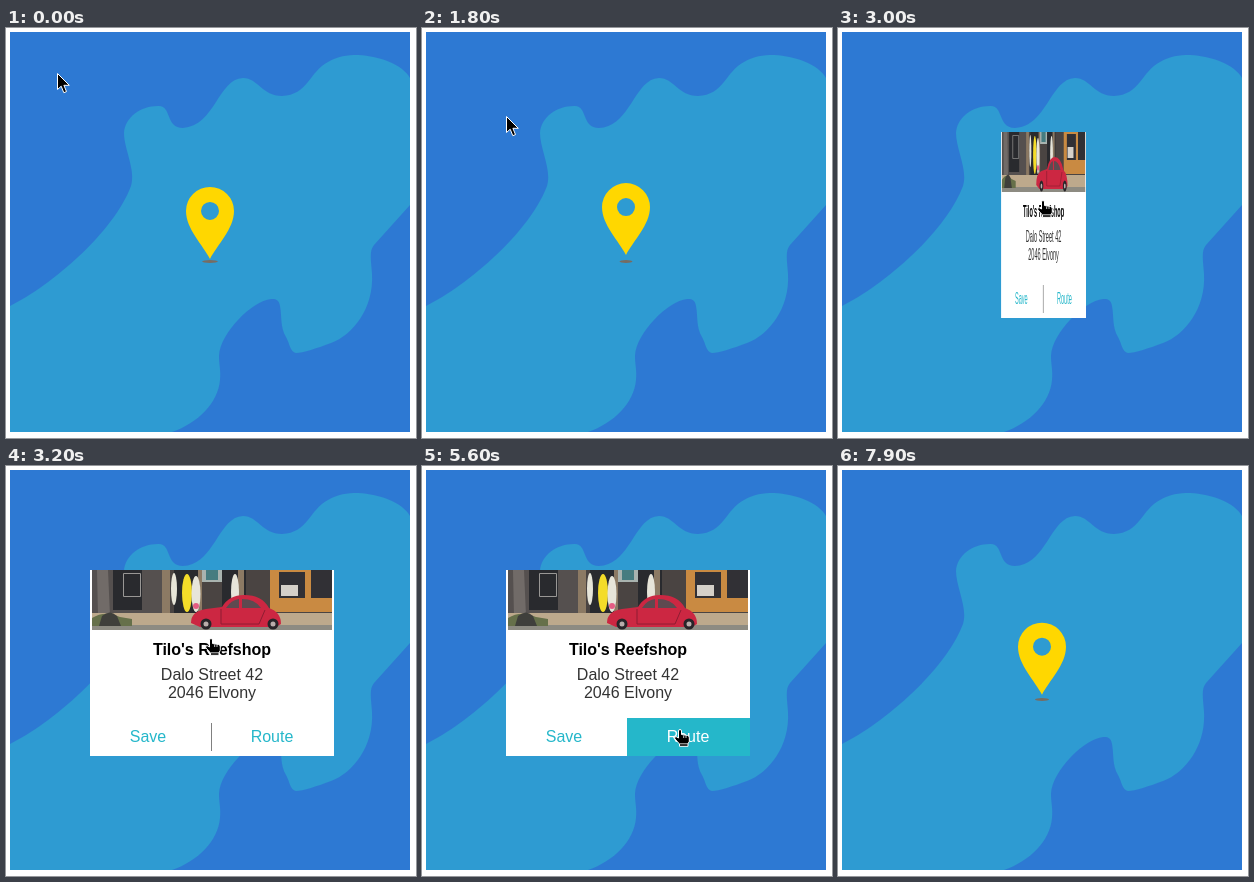
Recreate the animation shown at these times as an HTML page. Size 410 by 410 pixels, loop 8 s.

```html
<!DOCTYPE html>
<html lang="en">
<head>
<meta charset="utf-8">
<title>Map pin with info card</title>
<style>
  html, body { margin: 0; width: 100%; height: 100%; overflow: hidden; background: #fff; }
  svg { display: block; width: 100vw; height: 100vh; }
  text { font: 16px "Liberation Sans", Arial, sans-serif; text-anchor: middle; fill: #333; }
  .title { font-weight: bold; fill: #000; }
  .button rect { fill: none; }
  .button text { fill: #25b7ca; }
  .button.hover rect { fill: #25b7ca; }
  .button.hover text { fill: #fff; }
  .button.hover line { display: none; }
</style>
</head>
<body>
<svg viewBox="0 0 410 410">
  <rect x="4" y="4" width="400" height="400" fill="#2d79d3"/>
  <path fill="#2e9bd2" d="M4 278C45 258 108 204 125 158C130 142 118 121 118 105
    C119 89 135 78 152 78C166 77 159 100 177 100C209 98 212 51 237 50
    C252 50 256 68 276 68C302 67 303 44 322 34C332 28 341 27 352 27
    C374 28 397 37 404 50V177L368 217C363 223 365 232 366 246
    C368 280 347 307 325 315C312 320 296 325 290 325C284 324 284 316 280 309
    C274 299 276 288 274 278C273 271 269 271 265 271C246 273 214 305 213 328
    C213 337 215 342 214 352C212 375 192 395 166 404H4Z"/>

  <g id="marker">
    <ellipse id="shadow" cx="204" cy="233.5" ry="1.5" fill="#776c62"/>
    <path id="pin" fill="#ffd700" fill-rule="evenodd"
      d="M0 72C-7 58-24 42-24 24A24 24 0 0 1 24 24C24 42 7 58 0 72ZM-9 24a9 9 0 1 0 18 0a9 9 0 1 0-18 0Z"/>
  </g>

  <g id="card">
    <rect x="84" y="104" width="244" height="186" fill="#fff"/>
    <svg x="86" y="104" width="240" height="60" viewBox="0 0 240 60">
      <rect width="240" height="60" fill="#4a4442"/>
      <path fill="#55504f" d="M0 0h76v46H0z"/>
      <path fill="#292a2e" d="M21 0h29v40h-29zM82 0h24v44h-24zM130 0h24v44h-24z"/>
      <path fill="none" stroke="#999795" d="M31.500 3.500h17v23h-17z"/>
      <path fill="#716b68" d="M5 0h11l2 46H6z"/>
      <path fill="#8c7a64" d="M70 0h8v44h-8zM106 0h4v44h-4zM146 0h6v44h-6z"/>
      <path fill="#a9b3af" d="M110 0h20v12h-20z"/>
      <path fill="#467c80" d="M114 0h12v10h-12z"/>
      <path fill="#c98a42" d="M178 0h62v42h-62z"/>
      <path fill="#313035" d="M187 2h26v26h-26zM219 0h21v28h-21z"/>
      <path fill="#d5d0c9" d="M189 15h17v11h-17z"/>
      <path fill="#bda98c" d="M0 43h240v17H0z"/>
      <path fill="#8d8b82" d="M0 55h240v5H0z"/>
      <path fill="#66704a" d="M0 48q13-8 28-1l12 2v7H0z"/>
      <path fill="#3f3f3b" d="M10 46q8-7 15 0l4 10H7z"/>
      <ellipse cx="95" cy="23" rx="5" ry="19" fill="#f4dc29"/>
      <g fill="#e7e5d9">
        <ellipse cx="82" cy="19" rx="3" ry="16"/>
        <ellipse cx="104" cy="24" rx="4.500" ry="18"/>
        <ellipse cx="143" cy="22" rx="4" ry="18"/>
      </g>
      <circle cx="104" cy="36" r="3" fill="#e55c83"/>
      <path fill="#cc2742" d="M99 53q0-12 15-14l16-2q7-12 22-12q18 0 25 13q12 4 12 16l-5 3h-76z"/>
      <path fill="#5d4a50" d="M134 38q5-8 13-9v9zM150 29q13 0 19 9h-19z"/>
      <path fill="none" stroke="#8e1d32" d="M129 39v15h38l6-14"/>
      <g fill="#b9adab" stroke="#282529" stroke-width="3">
        <circle cx="114" cy="54" r="4"/><circle cx="181" cy="54" r="4"/>
      </g>
    </svg>
    <text class="title" x="206" y="189">Tilo's Reefshop</text>
    <text x="206" y="214">Dalo Street 42</text>
    <text x="206" y="232">2046 Elvony</text>
    <g class="button" id="save">
      <rect x="84" y="252" width="116" height="38"/>
      <text x="142" y="276">Save</text>
    </g>
    <g class="button" id="route">
      <rect x="205" y="252" width="123" height="38"/>
      <line x1="205.500" x2="205.500" y1="257" y2="285" stroke="#808080"/>
      <text x="266" y="276">Route</text>
    </g>
  </g>

  <g id="cursor" stroke="#fff" stroke-linejoin="round">
    <path id="arrow" d="M.5.500V16.500L4.200 13.200 6.800 19.700 9.500 18.600 6.900 12.300H12.300Z"/>
    <g id="hand" transform="translate(-1 -1)">
      <path d="M4.500 9V2a1.500 1.500 0 0 1 3 0v3.500l6 1q1.800 .5 1.800 2.300v3.500l-1.300 2.500v2.500H5.500v-2.300L.8 9.800Q.3 7.500 2 7.500Z"/>
      <path fill="none" stroke-width=".8" d="M6 14.800h8M9.700 6.500v2.500M12 7v2"/>
    </g>
  </g>
</svg>
<script>
const LOOP = 8000, STEP = 100, CARD_OPEN = 3000, CARD_CLOSE = 6500;
const el = id => document.getElementById(id);
const between = (t, from, to) => t >= from && t < to;
const show = (id, on) => el(id).setAttribute("display", on ? "inline" : "none");

const linear = u => u;
const easeIn = u => u * u;
const easeOut = u => 1 - (1 - u) ** 1.5;
const easeInOut = u => u * u * (3 - 2 * u);

// The cursor rests between glides.
const home = [51, 45];
const glides = [
  { from: 1300, to: 1900, end: [98, 107], ease: easeIn },
  { from: 1900, to: 2500, end: [200, 173], ease: linear },
  { from: 4000, to: 4700, end: [152, 260], ease: easeInOut },
  { from: 4700, to: 4900, end: [147, 269], ease: linear },
  { from: 5200, to: 5600, end: [253, 264], ease: easeInOut },
  { from: 5600, to: 6100, end: [286, 265], ease: linear },
  { from: 6100, to: 6500, end: [369, 244], ease: easeOut },
  { from: 6500, to: 7000, end: [81, 55], ease: easeOut }
];

function cursorAt(t) {
  return glides.reduce((pos, { from, to, end, ease }) => {
    const u = ease(Math.min(1, Math.max(0, (t - from) / (to - from))));
    return pos.map((p, i) => p + (end[i] - p) * u);
  }, home);
}

function draw(time) {
  const t = Math.floor(time / STEP) * STEP;
  const open = between(t, CARD_OPEN, CARD_CLOSE);

  // The bob picks up a new phase once the card has closed.
  const phase = t < CARD_CLOSE ? t - 400 : t - 4900;
  const bob = Math.cos(phase / 4000 * 2 * Math.PI);
  el("pin").setAttribute("transform", `translate(204 ${156.7 + 2.7 * bob})`);
  el("shadow").setAttribute("rx", 7 + bob);
  show("marker", !open);

  // The card turns to face the viewer.
  const turn = Math.min(1, Math.max(0, (t - CARD_OPEN) / 200));
  const scale = 0.348 + 0.652 * Math.sin(turn * Math.PI / 2);
  el("card").setAttribute("transform", `translate(205.3 0) scale(${scale} 1) translate(-205.3 0)`);
  show("card", open);
  el("save").classList.toggle("hover", between(t, 4700, 5400));
  el("route").classList.toggle("hover", between(t, 5600, CARD_CLOSE));

  const hand = between(t, 2400, 6300);
  el("cursor").setAttribute("transform", `translate(${cursorAt(t).map(Math.round)})`);
  show("cursor", t < 7400);
  show("arrow", !hand);
  show("hand", hand);
}

const start = performance.now();
function tick() {
  draw((performance.now() - start) % LOOP);
  requestAnimationFrame(tick);
}
tick();
</script>
</body>
</html>
```
